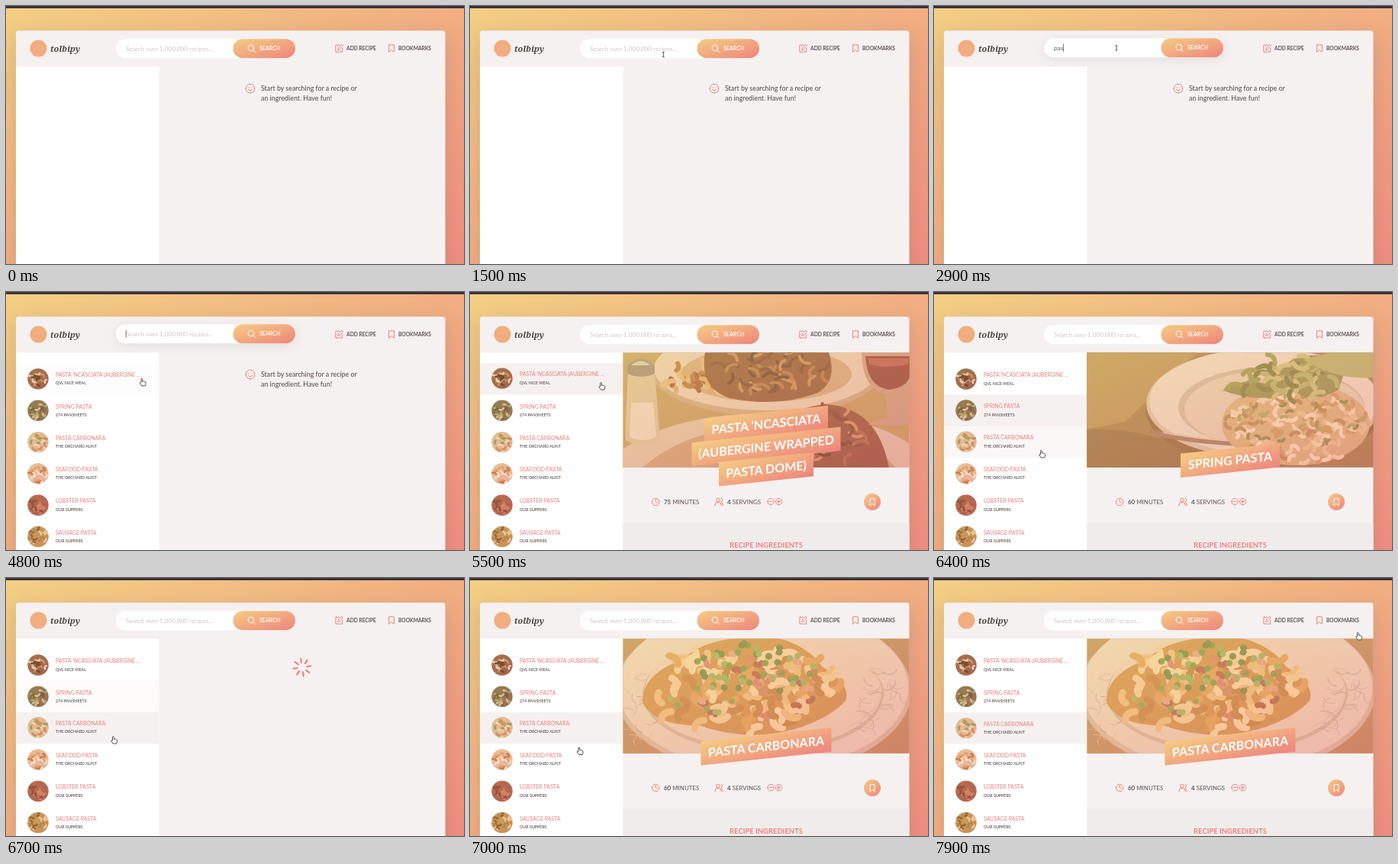
Write an HTML page that moves like this. It is 600 px wide and 338 px high and loops after 8000 ms.

```html
<!DOCTYPE html>
<html lang="en">
<head>
<meta charset="utf-8">
<title>Recipe search</title>
<style>
  html, body { margin: 0; width: 100%; height: 100%; overflow: hidden; }
  svg { display: block; width: 600px; height: 338px; }
  text { font-family: Lato, "Open Sans", sans-serif; fill: #5f5451; white-space: pre; }
  .b { font-weight: 700; }
  .icon { fill: none; stroke: #ec817b; stroke-width: 1; stroke-linecap: round; stroke-linejoin: round; }
  .white { stroke: #fff; }
</style>
</head>
<body>
<svg id="stage" viewBox="0 0 600 338"></svg>
<script>
const PAPER = '#f5f1f0', ACCENT = '#ec817b', ROW = 41.3, LOOP = 8000;

let seed = 7;
const rnd = () => (seed = (seed * 16807) % 2147483647) / 2147483647;

const text = (x, y, size, str, extra = '') =>
  `<text x="${x}" y="${y}" font-size="${size}" ${extra}>${str}</text>`;
const oval = (cx, cy, rx, ry, fill, extra = '') =>
  `<ellipse cx="${cx}" cy="${cy}" rx="${rx}" ry="${ry}" fill="${fill}" ${extra}/>`;
const box = (x, y, w, h, fill, extra = '') =>
  `<rect x="${x}" y="${y}" width="${w}" height="${h}" fill="${fill}" ${extra}/>`;
const shape = (d, fill, extra = '') => `<path d="${d}" fill="${fill}" ${extra}/>`;
const icon = (x, y, d, cls = '') =>
  `<path class="icon ${cls}" transform="translate(${x} ${y})" d="${d}"/>`;
const ring = r => `M${-r} 0a${r} ${r} 0 1 0 ${2 * r} 0a${r} ${r} 0 1 0 ${-2 * r} 0`;

// Short curved strokes scattered over an ellipse
function dabs(n, cx, cy, rx, ry, colors, len, width) {
  let out = '';
  for (let i = 0; i < n; i++) {
    const a = rnd() * 6.283, r = Math.sqrt(rnd()), b = rnd() * 6.283;
    const x = cx + Math.cos(a) * r * rx, y = cy + Math.sin(a) * r * ry;
    const dx = Math.cos(b) * len, dy = Math.sin(b) * len * .7;
    out += `<path d="M${x.toFixed(1)} ${y.toFixed(1)}q${(dx * .5 - dy * .5).toFixed(1)} ${(dy * .5 + dx * .4).toFixed(1)} ${dx.toFixed(1)} ${dy.toFixed(1)}" stroke="${colors[i % colors.length]}" stroke-width="${width}" fill="none" stroke-linecap="round"/>`;
  }
  return out;
}

const domePhoto = () =>
  box(200, 79, 376, 152, '#b99b55') +
  oval(388, 105, 150, 57, '#c7a982') + oval(388, 101, 147, 54, '#eadbc4') +
  oval(388, 108, 112, 36, '#cdaa7d') +
  dabs(34, 300, 118, 40, 24, ['#a5692a', '#dba75c', '#8b4a20', '#e9bf77'], 13, 6) +
  shape('M308 79Q300 125 340 139Q402 152 456 132Q482 116 470 79Z', '#764422') +
  dabs(44, 393, 103, 70, 30, ['#3f2518', '#a86a35', '#5b3019', '#bd8246'], 18, 4) +
  shape('M200 206Q270 159 390 159Q520 159 576 199V231H200Z', '#dfcdb5') +
  shape('M225 231Q285 176 400 174Q515 176 558 231Z', '#c99e74') +
  shape('M382 231Q390 154 466 147Q535 151 549 231Z', '#7b3d27') +
  dabs(34, 466, 190, 58, 34, ['#44241a', '#a05538', '#612d1f', '#c98759'], 20, 4) +
  shape('M207 105Q203 188 204 194Q224 206 249 194L242 105Z', '#d9c9a4') +
  shape('M211 145L209 190Q226 198 244 190L240 145Z', '#f1e7d4') +
  shape('M206 107V96Q224 79 242 96V107Q224 115 206 107Z', '#898274') +
  shape('M211 96Q224 85 236 96Z', '#d7d0bf') +
  shape('M513 79Q514 128 545 134V164Q528 169 521 174H576V79Z', '#c69b82') +
  shape('M518 84Q520 124 549 128Q572 125 576 111V84Z', '#792b25') +
  shape('M522 87H576V94Q546 102 522 94Z', '#a94a3f');

const springPhoto = () =>
  box(200, 79, 376, 152, '#94733a') +
  shape('M200 79H345L250 170L200 180Z', '#ad8b4b') +
  shape('M200 180Q290 175 380 231H200Z', '#80602f') +
  oval(432, 153, 155, 75, '#75552f') +
  oval(432, 146, 154, 72, '#d9c9b2') + oval(432, 143, 150, 69, '#f0e8dd') +
  oval(442, 151, 122, 53, '#cdbda8') + oval(446, 154, 118, 52, '#e6dac7') +
  shape('M290 181Q355 195 430 196L426 202Q350 202 288 188Z', '#8d6e55') +
  shape('M300 184Q350 194 420 197', 'none', 'stroke="#f3dcc6" stroke-width="1.5"') +
  oval(474, 173, 97, 54, '#d6b57d') +
  dabs(130, 474, 175, 94, 50, ['#f5e5bd', '#c59957', '#e8cf98', '#fff0cf', '#a88545'], 11, 5) +
  dabs(26, 480, 165, 80, 40, ['#75843a', '#9aaa57'], 8, 4) +
  shape('M378 129Q405 112 430 119L470 88Q508 76 542 92L530 128Q500 145 470 130Q430 148 378 129Z', '#798b3f') +
  dabs(38, 468, 114, 72, 23, ['#a6b861', '#5f7130', '#c3c978', '#85983f'], 20, 6) +
  shape('M484 89L520 79H576V112Q528 116 484 89Z', '#a8b567');

const carbonaraPhoto = () =>
  box(200, 79, 376, 152, '#b48453') +
  oval(384, 148, 194, 110, '#d5c1a9') + oval(384, 144, 190, 107, '#eee1d0') +
  oval(384, 152, 158, 77, '#d3bda5') + oval(384, 149, 155, 75, '#efdfcb') +
  dabs(28, 535, 166, 32, 50, ['#b9a69a', '#cdbbae'], 20, 1) +
  dabs(22, 225, 166, 22, 48, ['#b9a69a', '#cdbbae'], 18, 1) +
  shape('M226 164Q225 126 276 108Q305 82 350 79H405Q444 90 461 116Q500 139 492 161Q464 190 409 202Q353 212 300 193Q244 194 226 164Z', '#c98c3c') +
  dabs(105, 357, 144, 119, 53, ['#efc77c', '#b87930', '#f7dca0', '#dca24d', '#ffe7b3'], 20, 9) +
  dabs(22, 365, 145, 112, 48, ['#a84c3d', '#cf7960', '#e0a184'], 8, 7) +
  dabs(46, 374, 118, 80, 34, ['#5f9838', '#83b653', '#4c832d'], 1, 8) +
  dabs(8, 300, 158, 45, 24, ['#709f43', '#8cba5b'], 1, 7);

const titleLine = (y, w, str) =>
  `<g transform="translate(388 ${y}) skewY(-6)">${box(-w / 2, -15.7, w, 31.4, 'url(#warm)')}` +
  text(0, 5.8, 16, str, 'class="b" text-anchor="middle" style="fill:#fff"') + '</g>';

const recipes = [
  { photo: domePhoto, mins: 75, lines: [[173, 162, "PASTA 'NCASCIATA"], [202.6, 195, '(AUBERGINE WRAPPED'], [232.2, 124, 'PASTA DOME)']] },
  { photo: springPhoto, mins: 60, lines: [[220.7, 130, 'SPRING PASTA']] },
  { photo: carbonaraPhoto, mins: 60, lines: [[220.7, 171, 'PASTA CARBONARA']] }
];

const recipeView = (r, i) => `<g id="recipe${i}">
  <g clip-path="url(#figure)">${r.photo()}${box(200, 79, 376, 152, 'url(#warm)', 'opacity=".46"')}</g>
  ${r.lines.map(l => titleLine(...l)).join('')}
  ${icon(243.3, 275, ring(4.8) + 'M0 -2.8V0L2 1.2')}
  ${text(254, 277.8, 7.95, `<tspan class="b">${r.mins}</tspan> MINUTES`)}
  ${icon(326, 275, 'M-5 4.5V3q0-2.3 2.3-2.3H.6Q3 .7 3 3v1.5M-3.4 -2.5a2.3 2.3 0 1 0 4.6 0a2.3 2.3 0 1 0 -4.6 0M3 -4.7q1.8.5 1.8 2.2T3 -.3M5.2 4.5V3q0-1.7-1.6-2.1')}
  ${text(337, 277.8, 7.95, '<tspan class="b">4</tspan> SERVINGS')}
  ${icon(394, 274.6, ring(4.2) + 'M-2 0H2')}${icon(404.6, 274.6, ring(4.2) + 'M-2 0H2M0 -2V2')}
  ${oval(527, 275, 11, 11, 'url(#warm)')}${icon(527, 275, 'M-3 4.6V-4.4H3V4.6L0 2.4Z', 'white')}
  ${box(200.5, 302, 375, 40, '#f0ecec')}
  ${text(388, 335, 9.45, 'RECIPE INGREDIENTS', `class="b" text-anchor="middle" style="fill:${ACCENT}"`)}
</g>`;

// Title, publisher, thumbnail base, thumbnail pieces
const rows = [
  ["PASTA 'NCASCIATA (AUBERGINE ...", 'QVL NICE MEAL', '#8d5c40', ['#e8d3b4', '#57301f', '#c48a55']],
  ['SPRING PASTA', '274 PANSHEETS', '#7d6a43', ['#a5a66a', '#595130', '#d7c69b']],
  ['PASTA CARBONARA', 'THE ORCHARD AUNT', '#ddbd98', ['#f4dfbb', '#c98d50', '#8e9654']],
  ['SEAFOOD PASTA', 'THE ORCHARD AUNT', '#e2bda3', ['#f7e5d2', '#c76840', '#dda35d']],
  ['LOBSTER PASTA', 'OUR SUPPERS', '#a65442', ['#c97658', '#7c3a2c', '#b99265']],
  ['SAUSAGE PASTA', 'OUR SUPPERS', '#c09050', ['#efd18c', '#8a4c2a', '#8f8a45']]
];

const rowView = ([title, source, base, tones], i) => `<g>
  ${box(13, 93.3, 187.5, ROW, PAPER, `id="hover${i}"`)}
  <g id="item${i}">
    <g clip-path="url(#thumb)">${box(28, 100, 28, 28, base)}${dabs(17, 42, 115, 11, 10, tones, 6, 2.6)}
    ${box(28, 100, 28, 28, 'url(#warm)', 'opacity=".22"')}</g>
    ${text(65, 111.3, 7, title, `style="fill:${ACCENT}"`)}
    ${text(65, 121.5, 5.35, source, 'font-weight="600"')}
  </g></g>`;

const spokes = [0, 1, 2, 3, 4, 5, 6, 7].map(k => {
  const c = Math.cos(k * Math.PI / 4), s = Math.sin(k * Math.PI / 4);
  return `M${6.5 * c} ${6.5 * s}L${11.5 * c} ${11.5 * s}`;
}).join('');

const stage = document.getElementById('stage');
stage.innerHTML = `<defs>
  <linearGradient id="page" x2="1" y2="1"><stop stop-color="#f3cf83"/><stop offset="1" stop-color="#f08d80"/></linearGradient>
  <linearGradient id="warm" x2="1" y2="1"><stop stop-color="#f5cd82"/><stop offset="1" stop-color="#ee847d"/></linearGradient>
  <filter id="soft" x="-30%" y="-30%" width="160%" height="160%"><feGaussianBlur stdDeviation="14"/></filter>
  <filter id="glow" x="-30%" y="-200%" width="160%" height="500%"><feGaussianBlur stdDeviation="7"/></filter>
  <clipPath id="figure"><rect x="200.5" y="79.5" width="375" height="150.3"/></clipPath>
  <clipPath id="thumb"><circle cx="42" cy="114" r="13.7"/></clipPath>
  </defs>
  ${box(0, 0, 600, 338, 'url(#page)')}
  ${box(11, 40, 567, 560, '#615551', 'rx="4" opacity=".2" filter="url(#soft)"')}
  ${box(0, 0, 600, 3, '#3a3338')}
  ${box(13, 32.3, 562.5, 560, PAPER, 'rx="4"')}
  ${box(13, 79.5, 187.5, 300, '#fff')}
  ${oval(42.5, 55.6, 11, 11, '#f2ac7d')}
  ${text(58, 59.6, 11, 'tolbipy', 'class="b" font-style="italic" style="font-family:\'Noto Serif\',serif;fill:#4f4542"')}
  <g id="search">
    ${box(144, 46, 235, 25, '#615551', 'id="lift" rx="12.5" filter="url(#glow)"')}
    ${box(144, 43.2, 235, 25, '#fff', 'rx="12.5"')}
    ${box(297.5, 43.2, 81.5, 25, 'url(#warm)', 'rx="12.5"')}
    ${icon(321, 55, ring(3.8) + 'M2.8 2.8L5.3 5.3', 'white')}
    ${text(332, 58.3, 7.1, 'SEARCH', 'font-weight="600" style="fill:#fff"')}
    ${text(157, 58.5, 8.2, 'Search over 1,000,000 recipes...', 'id="hint" style="fill:#d0c6c4"')}
    ${text(157, 58.5, 8.2, '', 'id="query"')}
    ${box(0, 50.5, .8, 10.5, '#5f5451', 'id="caret"')}
  </g>
  ${icon(436.5, 55.5, 'M.5 -4.2H-4.6V4.6H4.2V0M-1.8 1.8L-1.3 -.5L3.5 -5.2L5.2 -3.5L.4 1.2Z')}
  ${text(446, 58, 6.7, 'ADD RECIPE', 'class="b"')}
  ${icon(505, 55.4, 'M-3.4 4.8V-4.6H3.4V4.8L0 2.4Z')}
  ${text(514, 58, 6.65, 'BOOKMARKS', 'class="b"')}
  <g id="message">
    ${icon(320, 108, ring(5.9) + 'M-2.6 1.4q2.6 2.8 5.2 0M-2 -1.8v.2M2 -1.8v.2')}
    ${text(334, 111.3, 8.85, 'Start by searching for a recipe or', 'font-weight="500"')}
    ${text(334, 124.3, 8.85, 'an ingredient. Have fun!', 'font-weight="500"')}
  </g>
  <g id="results">${rows.map((r, i) => `<g transform="translate(0 ${ROW * i})">${rowView(r, i)}</g>`).join('')}</g>
  ${recipes.map(recipeView).join('')}
  <path id="spinner" class="icon" style="stroke-width:2.2" d="${spokes}"/>
  <g id="cursor" stroke="#3d3838" stroke-width=".9" stroke-linejoin="round" fill="#fff">
    <path id="arrow" d="M-2.5 -4.5V4.2L-.5 2.3L1 5.4L2.3 4.8L.9 1.9H3.6Z"/>
    <path id="beam" fill="none" d="M-1.4 -3.3Q0 -3.3 0 -2.5V2.5Q0 3.3 -1.4 3.3M1.4 -3.3Q0 -3.3 0 -2.5M0 2.5Q0 3.3 1.4 3.3"/>
    <path id="hand" d="M-2.5 .5v-4q0-1 .9-1t.9 1v2.6q2-.3 3.4.6 1 .4.9 2 0 1.7-1 3.3h-4.2q-1-1.6-2.6-3.4 0-1.4 1.7-.6z"/>
  </g>`;

const el = id => document.getElementById(id);
const show = (id, on) => el(id).setAttribute('visibility', on ? 'inherit' : 'hidden');
const move = (id, x, y, more = '') => el(id).setAttribute('transform', `translate(${x} ${y})${more}`);
const smooth = p => { p = Math.max(0, Math.min(1, p)); return p * p * (3 - 2 * p); };
const within = (t, a, b) => t >= a && t < b;
const pulse = (t, [a, b]) => smooth((t - a) / 300) - smooth((t - b) / 300);

const path = [
  [800, 577, 258], [1600, 239, 55], [3900, 239, 55], [4500, 179.5, 118], [5400, 179.5, 118],
  [5800, 140, 150], [6000, 139, 154], [6150, 139, 154], [6400, 142, 212], [6700, 142, 212],
  [7000, 144.5, 226.5], [7200, 147, 230], [7800, 557, 76]
];
const keys = [[2500, 'p'], [2600, 'pa'], [2900, 'pas'], [3000, 'past'], [3200, 'pasta'], [3700, '']];
const tints = [[4720, 6100], [5750, 6500], [6250, 9000], [7000, 7350]];
const lifts = [[4720, 5650], [5750, 6200], [6250, 6950], [7000, 7350]];
const loading = [[3700, 4200, 107, 131], [4950, 5350, 388, 117], [6100, 6350, 388, 117], [6500, 6950, 388, 117]];
const pages = [[5350, 6100], [6350, 6500], [6950, LOOP]];

function pointer(t) {
  const i = path.findIndex(k => k[0] > t);
  if (i < 0) return path[path.length - 1].slice(1);
  if (i === 0) return path[0].slice(1);
  const [t0, x0, y0] = path[i - 1], [t1, x1, y1] = path[i];
  const p = smooth((t - t0) / (t1 - t0));
  return [x0 + (x1 - x0) * p, y0 + (y1 - y0) * p];
}

function draw(t) {
  const focus = pulse(t, [1800, 4900]);
  move('search', 0, -.9 * focus);
  el('lift').setAttribute('opacity', .12 * focus);

  const typed = keys.reduce((s, [at, str]) => t >= at ? str : s, '');
  el('query').textContent = typed;
  show('hint', !typed);
  show('caret', within(t, 1800, 4900));
  el('caret').setAttribute('x', 156.7 + (typed ? el('query').getComputedTextLength() + .3 : 0));

  show('message', t < 4950);
  show('results', t >= 4200);
  rows.forEach((_, i) => {
    el('hover' + i).setAttribute('opacity', tints[i] ? pulse(t, tints[i]) : 0);
    move('item' + i, 0, lifts[i] ? -.9 * pulse(t, lifts[i]) : 0);
  });
  pages.forEach(([a, b], i) => show('recipe' + i, within(t, a, b)));

  const load = loading.find(([a, b]) => within(t, a, b));
  show('spinner', load);
  if (load) move('spinner', load[2], load[3], ` rotate(${(t - load[0]) * .18})`);

  const beam = within(t, 1500, 3980);
  const hand = within(t, 4250, 7320) || t >= 7700;
  show('cursor', t >= 800);
  show('beam', beam);
  show('hand', hand);
  show('arrow', !beam && !hand);
  move('cursor', ...pointer(t));
}

const start = performance.now();
function tick() {
  draw((performance.now() - start) % LOOP);
  requestAnimationFrame(tick);
}
tick();
</script>
</body>
</html>
```
